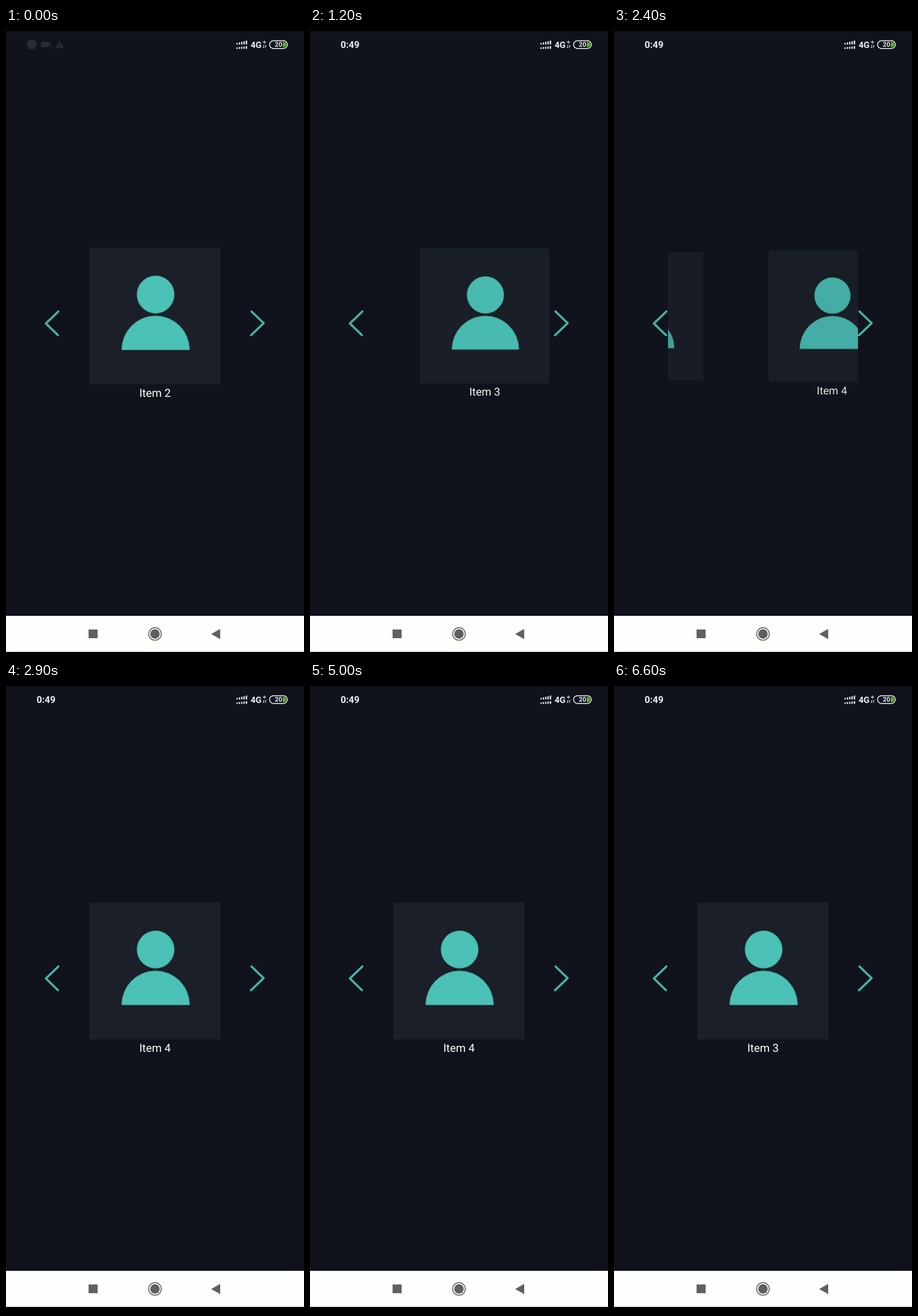
Recreate the animation shown at these times as an HTML page. Size 480 px wide and 1008 px high, loop 7.2 s.

```html
<!DOCTYPE html>
<html lang="en">
<head>
<meta charset="utf-8">
<title>Item carousel</title>
<style>
  html, body { margin: 0; width: 100%; height: 100%; overflow: hidden; background: #10131c; }
  svg { display: block; width: 100%; height: 100%; }
  text { font-family: Roboto, sans-serif; fill: #fff; text-rendering: geometricPrecision; }
  .status text { font-weight: 700; fill: #ececee; }
  .line { fill: none; stroke: #ececee; }
  .chevron { fill: none; stroke: #47b1a9; stroke-width: 3.5; stroke-linecap: round; stroke-linejoin: round; }
  .person { fill: #4cc1b6; stroke: #3a9f97; stroke-width: 1; }
  .nav { fill: #5f615f; }
</style>
</head>
<body>
<svg viewBox="0 0 480 1008">
  <defs>
    <clipPath id="view"><rect x="87" y="340" width="306" height="270"/></clipPath>
    <g id="card">
      <rect x="134.2" y="352.8" width="211.4" height="220" fill="#1b1f28"/>
      <g class="person">
        <circle cx="241" cy="428.5" r="30"/>
        <path d="M186.5 517.3a54.5 54.5 0 0 1 109 0z"/>
      </g>
    </g>
  </defs>

  <rect width="480" height="1008" fill="#10131c"/>
  <rect width="480" height="5" fill="#000"/>

  <g class="status">
    <g id="notices" fill="#292b34">
      <circle cx="41.5" cy="26.3" r="8"/>
      <rect x="56.5" y="22" width="12" height="9" rx="1.5"/>
      <path d="M68 25l4-2.5v8l-4-2.5z"/>
      <path d="M86.3 20l7 12.5h-14z"/>
      <path d="M86.3 24v4m0 1.5v1.6" stroke="#10131c" stroke-width="1.5"/>
    </g>
    <text id="clock" x="49.3" y="32" font-size="15.2">0:49</text>
    <g id="signal" fill="#ececee"></g>
    <text x="394" y="31.8" font-size="14">4G</text>
    <path class="line" d="M413.5 22.7h5.5m-2.7-2.7v5.4M415 27.5v4.5l-1.2-1.3M418 32v-4.5l1.2 1.3"/>
    <rect class="line" x="424.5" y="20.5" width="28.6" height="12.4" rx="6.2" stroke-width="1.5"/>
    <path d="M446 22.5q5.3 0 5.3 4.2t-5.3 4.2z" fill="#4cc60c"/>
    <text x="433" y="30.4" font-size="10.5">20</text>
  </g>

  <g id="slides" clip-path="url(#view)"></g>
  <path id="prev" class="chevron" d="M84.3 455.7L64.2 475L83.6 493.8"/>
  <path id="next" class="chevron" d="M395.5 455.7L415 474.5L394.6 493.9"/>

  <rect y="945" width="480" height="58" fill="#fdfffc"/>
  <rect y="1003" width="480" height="5" fill="#000"/>
  <g class="nav">
    <rect x="133" y="967" width="14.6" height="14"/>
    <circle cx="240" cy="974.2" r="7.6"/>
    <circle cx="240" cy="974.2" r="10.1" fill="none" stroke="#5f615f" stroke-width="1.5"/>
    <path d="M330.6 974.2L345 966v16.4z"/>
  </g>
</svg>
<script>
  const LOOP = 7200, TICK = 100, PAGE = 306, CX = 240, CY = 475, FIRST = 2;
  const SWIPE = 1.35, TAP = 3;
  const el = id => document.getElementById(id);
  const clamp = v => Math.min(Math.max(v, 0), 1);

  // Taps ease out harder than swipes and dim the chevron they press.
  const moves = [
    { start: 183, end: 1500, step: 1, power: SWIPE },
    { start: 1840, end: 2900, step: 1, power: SWIPE },
    { start: 3500, end: 3800, step: 1, power: TAP, button: "next" },
    { start: 4500, end: 5000, step: -1, power: TAP, button: "prev" },
    { start: 5520, end: 6600, step: -1, power: SWIPE }
  ];
  const progress = (m, t) => 1 - (1 - clamp((t - m.start) / (m.end - m.start))) ** m.power;

  const slides = [0, 1, 2, 3].map(i => FIRST + i);
  el("slides").innerHTML = slides.map(n =>
    `<g id="slide${n}"><use href="#card"/>` +
    `<text x="240" y="592.8" font-size="18" text-anchor="middle">Item ${n}</text></g>`).join("");

  const bars = (base, low, grow) => [0, 1, 2, 3, 4].map(i => {
    const h = low + i * grow;
    return `<rect x="${371 + i * 3.8}" y="${base - h}" width="2.2" height="${h}"/>`;
  }).join("");
  el("signal").innerHTML = bars(26.4, 2.2, 1) + bars(33.5, 2.2, 0.5);

  function pose(n, pos) {
    const off = n - pos, d = Math.min(Math.abs(off), 1), slide = el("slide" + n);
    slide.setAttribute("transform",
      `translate(${CX + off * PAGE} ${CY}) scale(${1 - 0.1 * d}) translate(${-CX} ${-CY})`);
    slide.setAttribute("opacity", 1 - 0.3 * d);
  }

  function draw(now) {
    const t = Math.floor(now % LOOP / TICK) * TICK;
    let pos = FIRST;
    for (const m of moves) {
      const p = progress(m, t);
      pos += m.step * p;
      if (m.button) el(m.button).style.opacity = t > m.start ? 0.5 + 0.5 * p : 1;
    }
    slides.forEach(n => pose(n, pos));
    el("notices").style.opacity = t < TICK ? 1 : 0;
    el("clock").style.opacity = clamp(t / 300);
  }

  const begin = performance.now();
  function loop() {
    draw(performance.now() - begin);
    requestAnimationFrame(loop);
  }
  loop();
</script>
</body>
</html>
```
